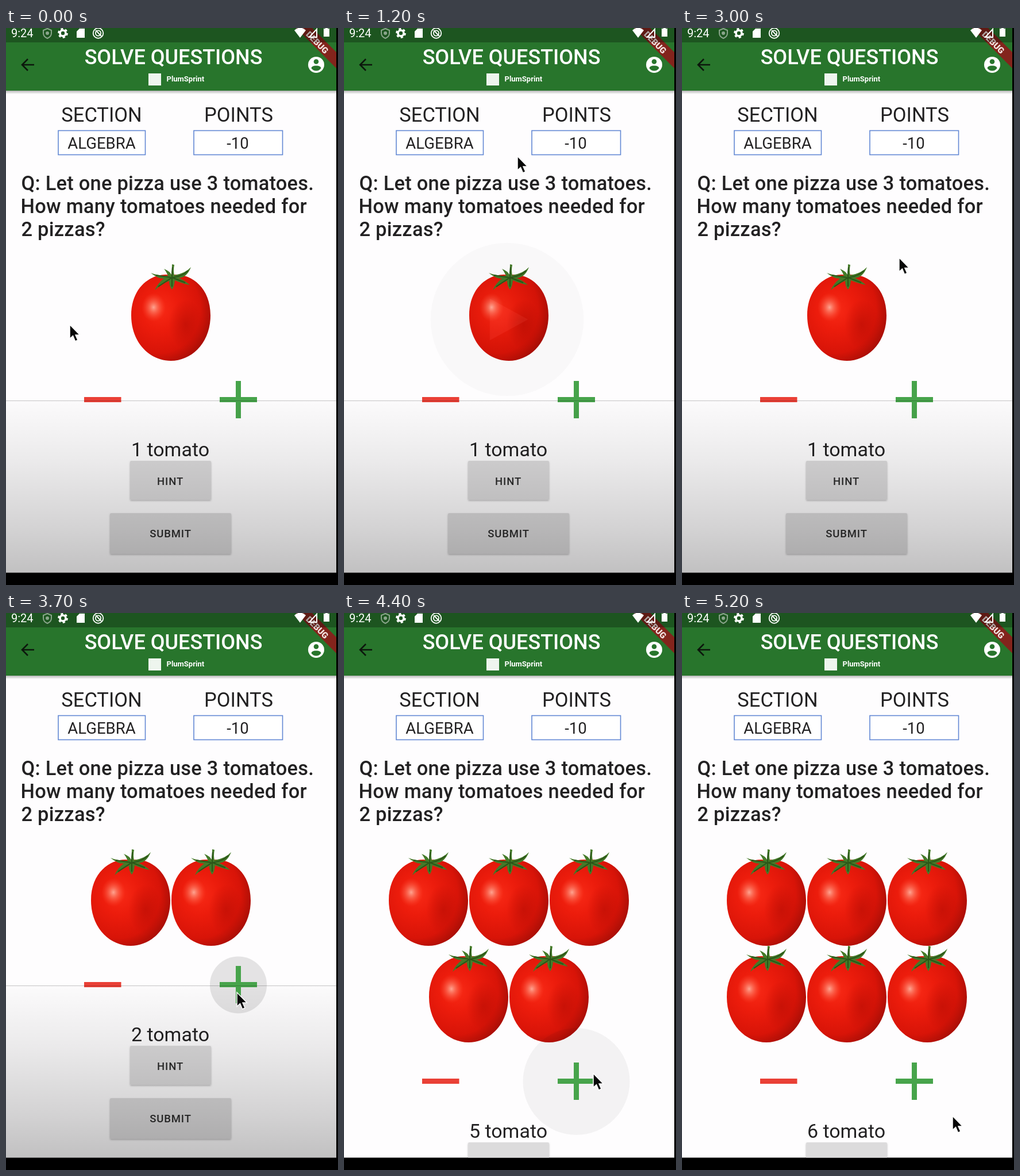
An HTML page that plays this animation: 578 px wide and 969 px high, repeating every 5300 ms.

```html
<!DOCTYPE html>
<html lang="en">
<head>
<meta charset="utf-8">
<title>Solve questions</title>
<style>
html, body { margin: 0; width: 100%; height: 100%; overflow: hidden; background: #000; }
svg { display: block; width: 578px; height: 969px; filter: blur(.55px); }
text { font-family: Roboto, sans-serif; fill: #222122; }
.mid { text-anchor: middle; }
.label { font-size: 34.5px; }
.value { font-size: 27.5px; }
.question { font-size: 34.4px; font-weight: 500; letter-spacing: .25px; }
.button { font-size: 18.5px; font-weight: 500; letter-spacing: .9px; fill: #2c2c2c; }
.white { fill: #fff; }
</style>
</head>
<body>
<svg viewBox="0 0 578 969">
  <defs>
    <linearGradient id="shade" x1="0" y1="0" x2="0" y2="1">
      <stop offset="0" stop-opacity=".01"/>
      <stop offset=".35" stop-opacity=".075"/>
      <stop offset=".75" stop-opacity=".17"/>
      <stop offset="1" stop-opacity=".24"/>
    </linearGradient>
    <linearGradient id="drop" x1="0" y1="0" x2="0" y2="1">
      <stop offset="0" stop-opacity=".28"/>
      <stop offset="1" stop-opacity="0"/>
    </linearGradient>
    <radialGradient id="skin" cx=".36" cy=".4" r=".68">
      <stop offset="0" stop-color="#f82a16"/>
      <stop offset=".35" stop-color="#ec1c0c"/>
      <stop offset=".75" stop-color="#d81408"/>
      <stop offset="1" stop-color="#a60e06"/>
    </radialGradient>
    <radialGradient id="dark">
      <stop offset="0" stop-color="#b80d04" stop-opacity=".6"/>
      <stop offset="1" stop-color="#b80d04" stop-opacity="0"/>
    </radialGradient>
    <radialGradient id="shine">
      <stop offset="0" stop-color="#ffb3a0" stop-opacity=".9"/>
      <stop offset=".35" stop-color="#ff8a72" stop-opacity=".6"/>
      <stop offset="1" stop-color="#ff4a30" stop-opacity="0"/>
    </radialGradient>
    <filter id="soft" x="-10%" y="-10%" width="120%" height="130%">
      <feDropShadow dx="0" dy="1.500" stdDeviation="1.500" flood-opacity=".25"/>
    </filter>
    <clipPath id="screen"><path d="M0 0H575V947.500H0z"/></clipPath>
    <g id="tomato">
      <path fill="url(#skin)" d="M0-74C28-80 69-58 69-4C69 44 36 75 0 75S-69 44-69-4C-69-58-28-80 0-74z"/>
      <ellipse cx="26" cy="12" rx="30" ry="44" fill="url(#dark)"/>
      <ellipse cx="-30" cy="-18" rx="21" ry="25" fill="url(#shine)"/>
      <path fill="#447a28" d="M2-93L6-92Q4-82 6-74Q25-77 35-88Q28-70 14-69Q24-65 33-57Q18-60 7-65Q6-54 2-49Q-3-55-3-64Q-14-60-28-48Q-23-60-12-68Q-23-68-35-78Q-20-72-5-73Q-9-82-12-85Q-2-81 1-75Q2-83 2-93z"/>
      <path fill="none" stroke="#2a5518" stroke-width="2" d="M3-88Q2-80 2-70L-22-54M2-70L25-61M2-70L2-54M4-70Q22-73 30-82M0-70L-26-74"/>
    </g>
  </defs>

  <rect width="578" height="969"/>
  <g clip-path="url(#screen)">
    <rect width="575" height="948" fill="#fefdfe"/>

    <rect width="575" height="109" fill="#28752c"/>
    <rect y="109" width="575" height="6" fill="url(#drop)"/>

    <path d="M49 64H29M38 54L28 64L38 74" fill="none" stroke="#0c160c" stroke-width="2.600"/>
    <text class="mid white" x="291.500" y="63" font-size="36" font-weight="500">SOLVE QUESTIONS</text>
    <rect x="248" y="79" width="22" height="21" fill="#eef5ee"/>
    <text class="white" x="279.500" y="93" font-size="13" font-weight="700">PlumSprint</text>
    <circle cx="540" cy="64" r="14" fill="#fff"/>
    <circle cx="540" cy="58.500" r="4.300" fill="#28752c"/>
    <path d="M531.500 70Q532 65.500 540 65.500T548.500 70Q545 74.500 540 74.500T531.500 70z" fill="#28752c"/>

    <path d="M505 0H533L575 42V70z" fill="#8b1e1c" opacity=".92"/>
    <text class="mid" transform="translate(542 25) rotate(45)" y="5.500" font-size="15" font-weight="900" style="fill:#f4e4e2">DEBUG</text>

    <!-- The system bar lies over the app, ribbon included. -->
    <rect width="575" height="25" fill-opacity=".28"/>
    <text class="white" x="9" y="16" font-size="20">9:24</text>
    <path d="M72 1L79 4V9Q79 15 72 18Q65 15 65 9V4z" fill="none" stroke="#8aa58b" stroke-width="2"/>
    <circle cx="72" cy="9" r="3" fill="#8aa58b"/>
    <g fill="none" stroke="#fff">
      <circle cx="99" cy="9" r="5" stroke-width="3.600"/>
      <circle cx="99" cy="9" r="7.400" stroke-width="3" stroke-dasharray="3.900 3.850"/>
      <circle cx="160.500" cy="9" r="8.800" stroke-width="1.800"/>
      <circle cx="160.500" cy="9" r="4.600" stroke-width="1.800"/>
      <path d="M156 4L166 14" stroke-width="1.800"/>
      <path d="M528 16L541 2V16z" stroke-width="2"/>
    </g>
    <g fill="#fff">
      <path d="M128 1H137V17H123V6z"/>
      <path d="M502 4Q512-5 522 4L512 17z"/>
      <path d="M553 1H556V-1H560V1H563V15H553z"/>
    </g>

    <text class="label mid" x="166.500" y="163">SECTION</text>
    <text class="label mid" x="405" y="163">POINTS</text>
    <g fill="#fff" stroke="#6288d4" stroke-width="1.600">
      <rect x="91" y="178.500" width="151.500" height="42"/>
      <rect x="327" y="178.500" width="154.500" height="42"/>
    </g>
    <text class="value mid" x="166.500" y="210">ALGEBRA</text>
    <text class="value mid" x="403.500" y="210">-10</text>

    <text class="question" x="26.500" y="282">Q: Let one pizza use 3 tomatoes.</text>
    <text class="question" x="25.500" y="322">How many tomatoes needed for</text>
    <text class="question" x="26.500" y="362">2 pizzas?</text>

    <g id="crop"></g>

    <g id="panel">
      <g id="ripples"></g>
      <path d="M136 646.500H200.500" stroke="#ea4036" stroke-width="9"/>
      <path d="M372 646.500H437M404.500 614V679" stroke="#47a44b" stroke-width="9"/>
      <text class="mid" id="count" x="286" y="745" font-size="34"></text>
      <g fill="#dcdbdc" filter="url(#soft)">
        <rect x="216" y="753" width="141" height="68" rx="2"/>
        <rect x="181" y="844" width="211" height="71" rx="2"/>
      </g>
      <text class="button mid" x="286" y="795">HINT</text>
      <text class="button mid" x="286.500" y="886">SUBMIT</text>
    </g>

    <path id="cursor" d="M0 0V24.500L5.500 19.500L9.500 29L14 27L10 18H17.500z" fill="#080808" stroke="#fff" stroke-width="1.500"/>

    <g id="controls">
      <rect y="648" width="575" height="300" fill="url(#shade)"/>
      <path d="M0 648.500H575" stroke="#000" stroke-opacity=".22"/>
    </g>
    <g id="bezel">
      <circle r="68" fill-opacity=".5"/>
      <path d="M-15.400-18.500L18.500 0L-15.400 18.500z" fill="#fff"/>
    </g>
  </g>
</svg>
<script>
const LOOP = 5300, STEP = 100, ROW = 168;
const PRESSES = [3300, 3600, 3850, 4100, 4550];
const TAP = 150;
// time, x, y of the pointer tip
const PATH = [
  [0, 111, 516], [720, 111, 516], [1200, 302, 223], [1500, 240, 268],
  [2200, 381, 274], [2500, 385, 276], [2900, 372, 335], [3250, 402, 660],
  [3970, 402, 660], [4100, 434, 801], [4750, 434, 801], [5200, 471, 875]
];

const $ = id => document.getElementById(id);
const clamp = v => Math.min(1, Math.max(0, v));
const ramp = (t, a, b) => clamp((t - a) / (b - a));
const add = (name, parent) =>
  parent.appendChild(document.createElementNS('http://www.w3.org/2000/svg', name));
const set = (el, attrs) => {
  for (const key in attrs) el.setAttribute(key, attrs[key]);
};

const tomatoes = Array.from({ length: 6 }, () => add('use', $('crop')));
tomatoes.forEach(el => set(el, { href: '#tomato' }));
const ripples = PRESSES.map(() => add('circle', $('ripples')));
ripples.forEach(el => set(el, { cx: 404.5, cy: 647 }));

function pointer(t) {
  const i = PATH.findIndex(p => p[0] > t);
  if (i < 0) return PATH[PATH.length - 1].slice(1);
  const [a, b] = [PATH[i - 1], PATH[i]];
  const k = ramp(t, a[0], b[0]);
  const ease = k * k * (3 - 2 * k);
  return [1, 2].map(j => a[j] + (b[j] - a[j]) * ease);
}

function draw(t) {
  const n = 1 + PRESSES.filter(p => t >= p + TAP).length;

  tomatoes.forEach((el, i) => {
    const row = Math.floor(i / 3), inRow = Math.min(3, n - row * 3);
    const x = 287 + 140 * (i % 3 - (inRow - 1) / 2);
    set(el, {
      transform: `translate(${x} ${504 + row * ROW})`,
      visibility: i < n ? 'visible' : 'hidden'
    });
  });
  set($('panel'), { transform: `translate(0 ${n > 3 ? ROW : 0})` });
  $('count').textContent = n + ' tomato';

  ripples.forEach((el, i) => {
    const age = t - PRESSES[i];
    set(el, {
      r: 93 * (.3 + .7 * ramp(age, 0, 300)),
      'fill-opacity': age < 0 ? 0 : .1 * (1 - ramp(age, 200, 380))
    });
  });

  set($('cursor'), { transform: `translate(${pointer(t)})` });
  set($('controls'), { opacity: 1 - ramp(t, 3750, 4050) });

  const flash = ramp(t, 720, 1220);
  set($('bezel'), {
    transform: `translate(284 507) scale(${1 + flash})`,
    opacity: flash > 0 ? 1 - flash : 0
  });
}

const start = performance.now();
function tick() {
  const t = (performance.now() - start) % LOOP;
  draw(Math.floor(t / STEP) * STEP);
  requestAnimationFrame(tick);
}
tick();
</script>
</body>
</html>
```
